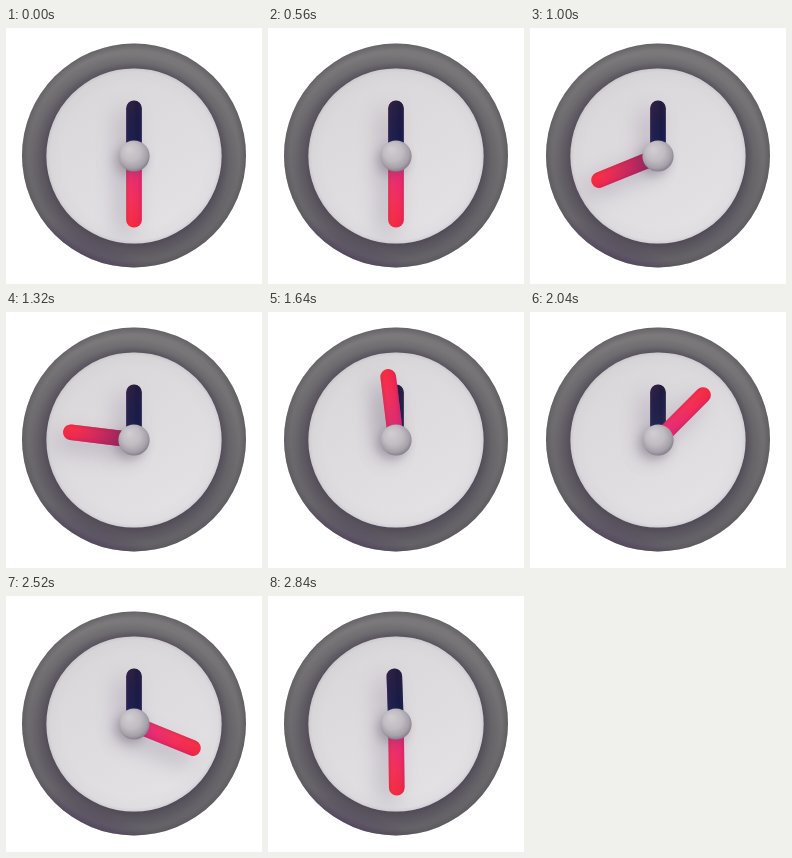
An HTML page with a canvas for the animation above (2.88 s loop, 256 px wide and 256 px high).

```html
<!DOCTYPE html>
<html lang="en">
<head>
<meta charset="utf-8">
<title>Clock</title>
<style>
html, body { margin: 0; width: 100%; height: 100%; overflow: hidden; background: #fff; }
canvas { display: block; width: 100vmin; height: 100vmin; }
</style>
</head>
<body>
<canvas id="stage" width="256" height="256"></canvas>
<script>
const ctx = document.getElementById('stage').getContext('2d');
const LOOP = 2880, TICK = 40, REST = 640, QUARTER = 560;
const CX = 128, CY = 128, RAD = Math.PI / 180;

function fillStops(gradient, stops) {
  for (const [at, color] of stops) gradient.addColorStop(at, color);
  return gradient;
}
const linear = (x0, y0, x1, y1, ...stops) =>
  fillStops(ctx.createLinearGradient(x0, y0, x1, y1), stops);
const radial = (x, y, r0, r1, ...stops) =>
  fillStops(ctx.createRadialGradient(x, y, r0, x, y, r1), stops);

function disc(x, y, r, fill) {
  ctx.beginPath();
  ctx.arc(x, y, r, 0, 2 * Math.PI);
  ctx.fillStyle = fill;
  ctx.fill();
}

const rim = linear(90, 16, 165, 240, [0, '#7c7a7b'], [0.5, '#737173'], [1, '#6c6a6d']);
const rimEdge = radial(CX, CY, 86, 112,
  [0, 'rgba(66,60,70,.08)'], [0.3, 'rgba(66,60,70,0)'],
  [0.75, 'rgba(60,54,66,0)'], [1, 'rgba(60,54,66,.3)']);
// Shifted down-left, so the inner slope darkens at the top right.
const rimSlope = fillStops(ctx.createRadialGradient(128, 128, 86, 122, 138, 112),
  [[0, 'rgba(60,50,70,.6)'], [0.5, 'rgba(66,58,74,.2)'], [1, 'rgba(70,62,76,0)']]);
const rimTint = linear(150, 130, 100, 245,
  [0, 'rgba(60,35,90,0)'], [0.78, 'rgba(60,35,90,0)'], [1, 'rgba(60,35,90,.4)']);
const face = linear(80, 45, 175, 210, [0, '#dad7da'], [0.5, '#dfdce0'], [1, '#e4e2e5']);
const faceShade = radial(CX, CY, 72, 88,
  [0, 'rgba(150,145,158,0)'], [0.75, 'rgba(150,145,158,.05)'], [1, 'rgba(140,134,148,.22)']);
const hub = fillStops(ctx.createRadialGradient(123, 121, 1, 127, 126, 18),
  [[0, '#d0cdd1'], [0.5, '#c0bcc2'], [0.82, '#a6a1a9'], [1, '#827c88']]);

const ease = p => {
  const a = p ** 1.9, b = (1 - p) ** 1.9;
  return a / (a + b);
};

// The long hand rests at six, then sweeps one quarter at a time.
function longAngle(t) {
  if (t < REST) return 180;
  const step = (t - REST) / QUARTER, whole = Math.floor(step);
  return 180 + 90 * (whole + ease(step - whole));
}

function shortAngle(t) {
  return t > 2720 ? -2 * Math.min((t - 2720) / 120, (LOOP - t) / 40) : 0;
}

function castShadow(color, blur, dx, dy) {
  ctx.shadowColor = color;
  ctx.shadowBlur = blur;
  ctx.shadowOffsetX = dx;
  ctx.shadowOffsetY = dy;
}

function drawHand(angle, length, paint) {
  ctx.save();
  ctx.translate(CX, CY);
  ctx.rotate(angle * RAD);
  ctx.beginPath();
  ctx.roundRect(-7.8, -length, 15.6, length + 8, 7.8);
  castShadow('rgba(100,88,110,.32)', 22, -9, 9);
  for (const fill of paint) {
    ctx.fillStyle = fill;
    ctx.fill();
    ctx.shadowColor = 'transparent';
  }
  ctx.restore();
}

function navyPaint() {
  return [
    linear(0, -55, 0, -10, [0, '#30213f'], [0.45, '#23204a'], [1, '#182253']),
    linear(-8, 0, 8, 0, [0, 'rgba(68,40,88,.5)'], [0.35, 'rgba(30,24,60,.1)'],
      [0.7, 'rgba(14,18,62,.4)'], [1, 'rgba(34,30,72,.4)'])
  ];
}

function redPaint(angle) {
  const a = angle * RAD;
  const facing = 0.6 * Math.cos(a) + 0.8 * Math.sin(a);
  const side = facing > 0 ? 8 : -8;
  const leftward = Math.max(0, -Math.sin(a));
  return [
    linear(0, -70, 0, -12, [0, '#f12a3f'], [0.45, '#f4305c'], [1, '#e92f82']),
    linear(-side, 0, side, 0, [0, 'rgba(205,40,65,.4)'], [0.3, 'rgba(255,60,80,.2)'],
      [0.65, 'rgba(240,30,90,.1)'], [1, 'rgba(190,28,100,.5)']),
    linear(0, -60, 0, -10, [0, 'rgba(130,32,78,0)'],
      [1, `rgba(130,32,78,${0.08 + 0.65 * leftward})`])
  ];
}

function draw(t) {
  ctx.clearRect(0, 0, 256, 256);
  for (const fill of [rim, rimSlope, rimEdge, rimTint]) disc(CX, CY - 0.5, 112, fill);
  for (const fill of [face, faceShade]) disc(CX, CY, 87.6, fill);

  const red = longAngle(t);
  drawHand(shortAngle(t), 55.5, navyPaint());
  drawHand(red, 71.5, redPaint(red));

  ctx.save();
  castShadow('rgba(70,58,85,.25)', 10, -3, 4);
  disc(CX, CY, 15.6, hub);
  ctx.restore();
}

const start = performance.now();
function frame(now) {
  const t = Math.max(0, now - start) % LOOP;
  draw(Math.floor(t / TICK) * TICK);
  requestAnimationFrame(frame);
}
draw(0);
requestAnimationFrame(frame);
</script>
</body>
</html>
```
